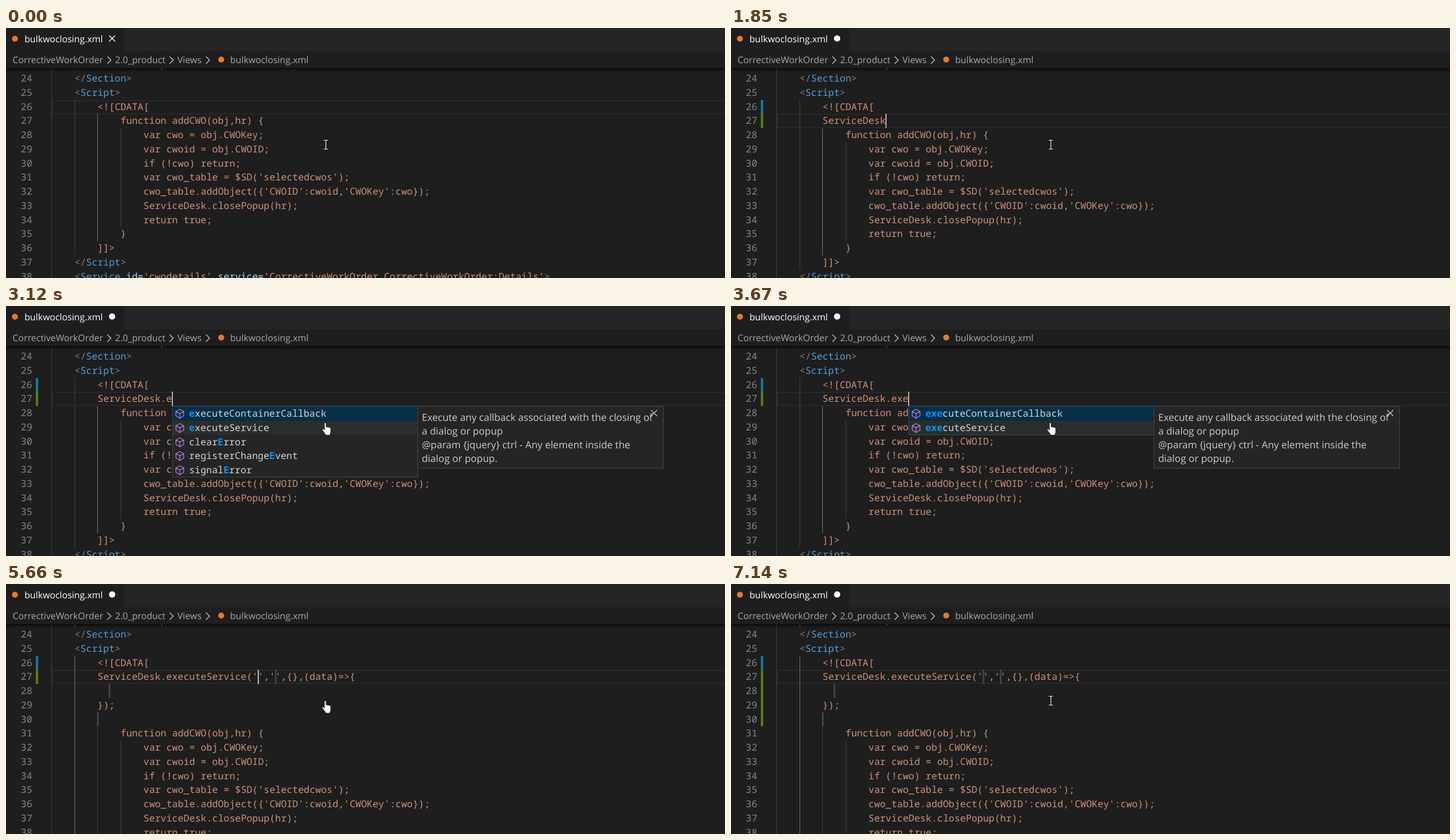
Recreate the animation shown at these times as an HTML page. Size 1206 by 420 pixels, loop 7.6 s.

```html
<!DOCTYPE html>
<html lang="en">
<head>
<meta charset="utf-8">
<title>Code editor</title>
<style>
html, body { margin: 0; width: 100%; height: 100%; overflow: hidden; background: #1e1e1e; }
svg { display: block; }
text { white-space: pre; text-rendering: geometricPrecision; }
.code { font: 16.035px "Noto Sans Mono", monospace; font-variant-ligatures: none; fill: #ce9178; }
.ui { font: 15.3px "Open Sans", "Noto Sans", sans-serif; fill: #a9a9a9; }
.doc { font: 16.53px "Open Sans", "Noto Sans", sans-serif; fill: #cccccc; }
.num { fill: #858585; text-anchor: end; }
.item { fill: #d4d4d4; }
.hit { fill: #0097fb; font-weight: bold; }
.dim { fill: #949596; }
.b { fill: #808080; } .t { fill: #569cd6; } .a { fill: #9cdcfe; } .e { fill: #d4d4d4; }
.line { fill: none; stroke: #c5c5c5; stroke-width: 1.3; }
.cube { fill: none; stroke: #b180d7; stroke-width: 1.3; stroke-linejoin: round; }
</style>
</head>
<body>
<svg id="stage" width="1206" height="420" viewBox="0 0 1206 420">
  <defs>
    <linearGradient id="shade" x2="0" y2="1">
      <stop offset="0" stop-color="#000" stop-opacity=".6"/>
      <stop offset="1" stop-color="#000" stop-opacity="0"/>
    </linearGradient>
    <path id="cube" class="cube" d="M7.5 0.5L14 4V11.5L7.5 15.5L1 11.5V4ZM1 4L7.5 7.6L14 4M7.5 7.6V15.5"/>
    <path id="cross" d="M-5 -5L5 5M5 -5L-5 5"/>
    <path id="chevron" class="line" d="M-3 -6L3 0L-3 6"/>
  </defs>
  <rect width="1206" height="420" fill="#1e1e1e"/>
  <g id="editor"></g>
  <rect width="1206" height="67" fill="#1e1e1e"/>
  <rect y="67" width="1206" height="7" fill="url(#shade)"/>
  <rect x="198" width="1008" height="39" fill="#252526"/>
  <circle cx="15" cy="18" r="5" fill="#e37933"/>
  <text class="ui" x="31" y="24" style="fill:#fff">bulkwoclosing.xml</text>
  <g id="mark"></g>
  <text class="ui" x="11" y="59">CorrectiveWorkOrder</text>
  <text class="ui" x="183" y="59">2.0_product</text>
  <text class="ui" x="287.5" y="59">Views</text>
  <circle cx="361" cy="53" r="5" fill="#e37933"/>
  <text class="ui" x="376" y="59">bulkwoclosing.xml</text>
  <use href="#chevron" x="173" y="54"/>
  <use href="#chevron" x="277.5" y="54"/>
  <use href="#chevron" x="338.5" y="54"/>
  <g id="popup"></g>
  <g id="pointer"></g>
</svg>
<script>
const LOOP = 7600, X0 = 76.6, CW = 9.621, FIRST = 23;
const $ = id => document.getElementById(id);
const esc = s => s.replace(/&/g, '&amp;').replace(/</g, '&lt;').replace(/>/g, '&gt;');
const colX = c => X0 + c * CW;
const rowY = n => Math.round(144.25 + (n - 27) * 23.75);
const rect = (x, y, w, h, fill, more = '') =>
  `<rect x="${x}" y="${y}" width="${w}" height="${h}" fill="${fill}" ${more}/>`;
const text = (x, y, cls, body) => `<text class="${cls}" x="${x}" y="${y}">${body}</text>`;
const span = (cls, s) => `<tspan class="${cls}">${esc(s)}</tspan>`;

// Each line: indent depth, then its text
const head = [[2, ' '.repeat(11) + 'p'], [1, '<\/Section>'], [1, '<' + 'Script>'], [2, '<![CDATA[']];
const tail = [
  [3, 'function addCWO(obj,hr) {'],
  [4, 'var cwo = obj.CWOKey;'],
  [4, 'var cwoid = obj.CWOID;'],
  [4, 'if (!cwo) return;'],
  [4, "var cwo_table = $SD('selectedcwos');"],
  [4, "cwo_table.addObject({'CWOID':cwoid,'CWOKey':cwo});"],
  [4, 'ServiceDesk.closePopup(hr);'],
  [4, 'return true;'],
  [3, '}'],
  [2, ']]>'],
  [1, '<\/Script>'],
  [1, "<Service id='cwodetails' service='CorrectiveWorkOrder.CorrectiveWorkOrder:Details'>"]
];
const call = "ServiceDesk.executeService('','',{},(data)=>{";

const methods = ['addQueryString', 'appUrl', 'attachmentDownloadUrl', 'attachmentUploadUrl', 'broadcast',
  'clearError', 'closeCurrentPopup', 'closeLayers', 'closePopup', 'confirmOnce', 'createObjectLink'];
const matches = ['executeContainerCallback', 'executeService', 'clearError', 'registerChangeEvent', 'signalError'];
const docs = {
  add: ['Given a url, add query string parameters to it', '@param {String} url - the url to add query string',
    'parameters to', '@param {Object} params - The query string', 'parameters to add',
    '@returns {String} - the new url with the query', 'string parameters added'],
  callback: ['Execute any callback associated with the closing of', 'a dialog or popup',
    '@param {jquery} ctrl - Any element inside the', 'dialog or popup.'],
  service: ['Executes a web service call to the backend.', '@param {String} app - The application that',
    'contains the service to call', '@param {String} service - The service name',
    '@param {Object} params - query string parameters', '@param {ServiceCallback}  ok - function to call',
    'after the service executes', '@param {ServiceError}  err - error handler to call if',
    'service execution failed']
};

const blinks = [230, 840, 1380, 2800, 3120, 4130, 4630, 5110, 5660, 6200, 6660, 7140];
const typing = [[380, ''], [1780, 'ServiceDesk'], [2330, 'ServiceDesk.'], [3120, 'ServiceDesk.e'],
  [3440, 'ServiceDesk.ex'], [3670, 'ServiceDesk.exe'], [5660, call]];
const between = (t, a, b) => t >= a && t < b;

function stateAt(t) {
  const step = typing.filter(s => t >= s[0]).pop();
  return {
    typed: step ? step[1] : null,
    caret: blinks.filter(b => t >= b).length % 2 === 1,
    menu: between(t, 1150, 1780) ? 'root' : between(t, 2330, 5660) ? 'member' : '',
    second: t >= 4360,
    gutter: t < 610 ? 0 : t < 5880 ? 1 : 4,
    hand: between(t, 1150, 1850) || between(t, 2330, 5730)
  };
}

function linesFor(typed) {
  if (typed === null) return [...head, ...tail];
  if (typed === call) return [...head, [2, call], [2, ''], [2, '});'], [3, ''], ...tail];
  return [...head, [typed ? 2 : 3, typed], ...tail];
}

function colour(s) {
  if (!/^<\/?\w/.test(s)) return esc(s);
  let words = 0;
  return s.replace(/<\/?|>|'[^']*'|=|\w+|\s/g, m =>
    /[<>]/.test(m) ? span('b', m) : m === '=' ? span('e', m) :
    /^\w/.test(m) ? span(words++ ? 'a' : 't', m) : m);
}

function drawEditor(s) {
  const done = s.typed === call, row = s.typed === null ? 26 : 27;
  const active = done ? 1 : 2;
  let out = rect(78, rowY(row) + 1, 1130, 22, 'none', 'stroke="#282828" stroke-width="2"');
  linesFor(s.typed).slice(0, 16).forEach(([depth, body], i) => {
    const n = FIRST + i, y = rowY(n);
    for (let d = 0; d < depth; d++)
      out += rect(Math.round(colX(d * 4) - .4), y, 1, rowY(n + 1) - y, d === active ? '#707070' : '#404040');
    if (n > FIRST) out += text(44, y + 17, 'code num', n);
    out += text(colX(depth * 4), y + 17, 'code', colour(body));
  });
  if (done) {
    for (const [c, n] of [[36, 27], [39, 27], [10, 28]])
      out += rect(Math.floor(colX(c)), rowY(n), 3, 24, '#7c7c7c', 'fill-opacity=".35"');
    out += rect(153, rowY(30), 2, 23, '#525252');
  }
  if (s.gutter) {
    out += rect(50, rowY(26), 4, 23, '#0c7d9d');
    out += rect(50, rowY(27), 4, rowY(27 + s.gutter) - rowY(27), '#587c0c');
  }
  if (s.caret) {
    const c = s.typed === null ? 17 : done ? 36 : 8 + s.typed.length;
    out += rect(Math.floor(colX(c)), rowY(row), 2, rowY(row + 1) - rowY(row), '#aeafad');
  }
  return out;
}

const box = (x, y, w, h) => rect(x + .5, y + .5, w - 1, h - 1, '#252526', 'stroke="#454545"');

function drawDoc(x, lines) {
  const w = 413;
  return box(x, 168, w, lines.length * 23 + 13) +
    lines.map((l, i) => text(x + 7.5, 192.5 + i * 23.05, 'doc', esc(l))).join('') +
    `<use href="#cross" class="line" x="${x + w - 16}" y="180"/>`;
}

const rootIcons =
  '<path class="line" d="M175 177l-3.5 3.5l-3 -3l3.5 -3.5c-4 -1.5 -7.5 2 -6 6l-6.5 6.5c-1.5 2 1 4.5 3 3l6.5 -6.5c4 1.5 7.5 -2 6 -6Z"/>' +
  '<path class="line" d="M160.5 211V197.5H175.5V211"/>' +
  '<path class="line" stroke-dasharray="2 1.6" d="M160 212.5H176"/>';

function drawMenu(s) {
  if (!s.menu) return '';
  const root = s.menu === 'root';
  const word = root ? '' : s.typed.split('.')[1];
  const names = root ? ['ServiceDesk', 'CDATA'] :
    !word ? methods : word === 'e' ? matches : matches.slice(0, 2);
  const x = root ? 154 : Math.round(colX(8 + s.typed.length));
  const w = root ? 537 : 412;
  const picked = s.second ? 1 : 0;
  const rows = names === methods ? 12 : names.length;
  let out = box(x, 168, w, rowY(28 + rows) - 167);
  names.forEach((name, i) => {
    const y = rowY(28 + i);
    const fill = i === picked ? '#062f4a' : i === 1 ? '#2a2d2e' : '';
    if (fill) out += rect(x + 1, y + 1, w - 2, 23, fill);
    if (!root) out += `<use href="#cube" x="${x + 5}" y="${y + 5}"/>`;
    const label = word ? name.replace(new RegExp('^' + word + '|E'), m => span('hit', m)) : name;
    out += text(x + 28, y + 17.5, 'code item', label);
  });
  if (!root) return out + drawDoc(x + w - 1, !word ? docs.add : s.second ? docs.service : docs.callback);
  return out + rootIcons + text(484.5, 209.5, 'code dim', 'PublicApi (novelu…') +
    '<use href="#chevron" x="665.5" y="204"/>';
}

const ibeam = '<path d="M533 188.5H535.5L536.5 189.5L537.5 188.5H540M533 203.5H535.5L536.5 202.5L537.5 203.5H540M536.5 189V203" fill="none" stroke="#e8e8e8" stroke-width="1.2"/>';
const hand = '<path d="M534 197.5c0 -2 3 -2 3 0v6c.5 -1.2 2.6 -1 2.8 .4c.6 -1 2.4 -.7 2.6 .6c.8 -.8 2.4 -.3 2.4 1.2v5.3c0 2 -1.3 3 -1.3 6h-7.5c0 -2.5 -3.5 -5 -5.3 -8.5c-.9 -1.8 1 -2.7 2.1 -1.5l1.2 1.5Z" fill="#fff" stroke="#111" stroke-width=".9"/>';
const closeMark = '<use href="#cross" x="178" y="17.5" fill="none" stroke="#e8e8e8" stroke-width="1.7"/>';
const dirtyMark = '<circle cx="178" cy="17.5" r="5.3" fill="#fff"/>';

let last = '';
function render(t) {
  const s = stateAt(t), key = JSON.stringify(s);
  if (key === last) return;
  last = key;
  $('editor').innerHTML = drawEditor(s);
  $('mark').innerHTML = s.typed === null ? closeMark : dirtyMark;
  $('popup').innerHTML = drawMenu(s);
  $('pointer').innerHTML = s.hand ? hand : ibeam;
}

const start = performance.now();
function tick() {
  render((performance.now() - start) % LOOP);
  requestAnimationFrame(tick);
}
tick();
</script>
</body>
</html>
```
